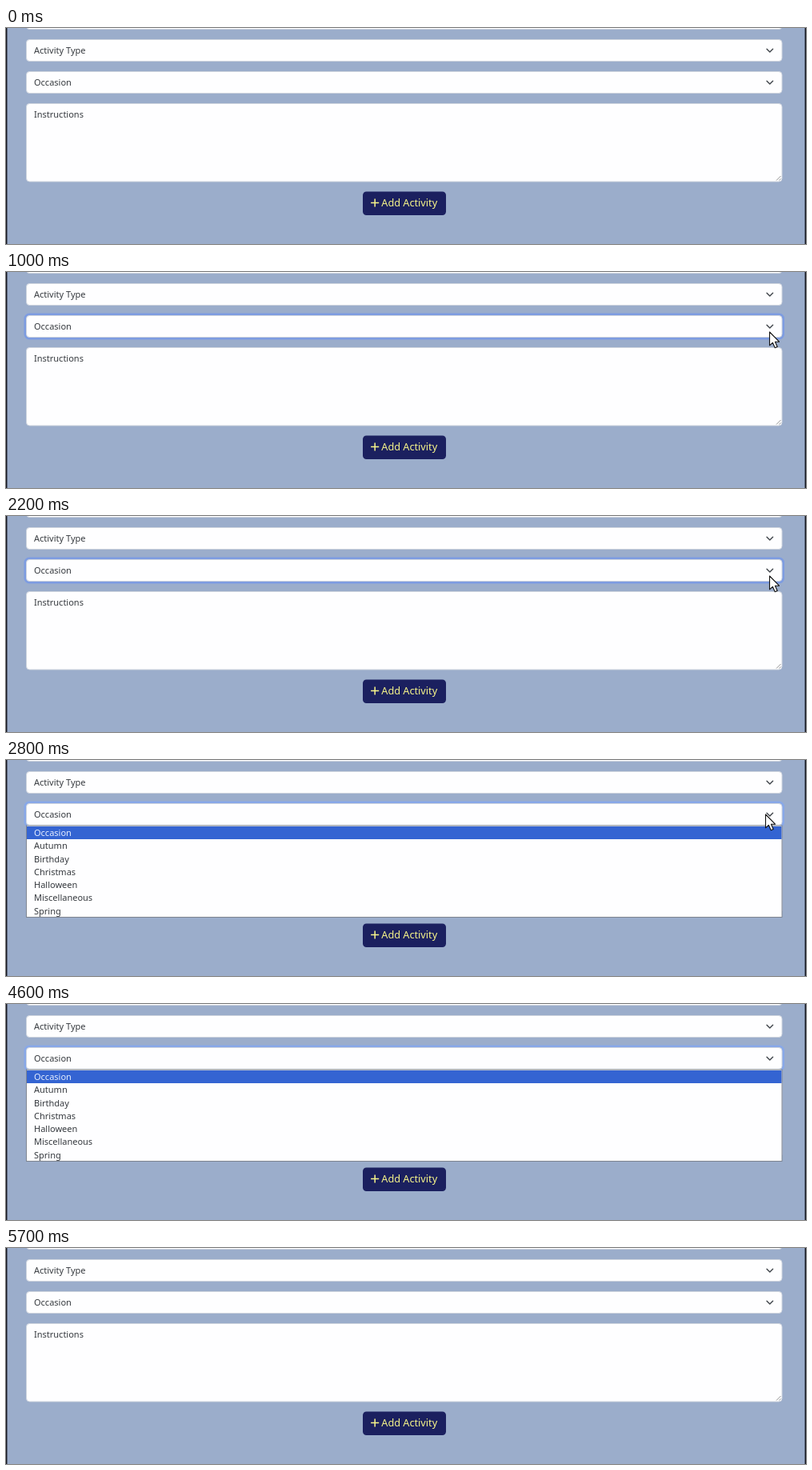
Recreate the animation shown at these times as an HTML page. Size 1000 px wide and 270 px high, loop 5800 ms.

```html
<!DOCTYPE html>
<html lang="en">
<head>
<meta charset="utf-8">
<style>
  html, body { margin: 0; width: 100%; height: 100%; overflow: hidden; background: #9badcb; }
  svg { display: block; width: 1000px; height: 270px; }
  text { font: 11px "Noto Sans", sans-serif; fill: #35393e; }
  .field { fill: #fefeff; stroke: #ced4de; }
  .line { fill: none; stroke: #40454b; stroke-width: 1.4; stroke-linecap: round; stroke-linejoin: round; }
  .button text, .button path { fill: #f8f68a; }
  .button text { font-size: 12.7px; }
  #menu text { font: 9.5px "Open Sans", sans-serif; }
</style>
</head>
<body>
<svg viewBox="0 0 1000 270">
  <defs>
    <clipPath id="page"><rect width="998" height="270"/></clipPath>
    <clipPath id="listArea"><rect x="25" y="82" width="946" height="114"/></clipPath>
    <filter id="shadow" x="-50%" y="-20%" width="200%" height="150%">
      <feDropShadow dx="0" dy="2" stdDeviation="3" flood-color="#223" flood-opacity=".35"/>
    </filter>
  </defs>

  <rect width="1000" height="270" fill="#9badcb"/>
  <rect class="field" x="25.5" y="-25" width="944.5" height="26.5" rx="4"/>

  <rect class="field" x="25.5" y="14.5" width="944.5" height="27" rx="4"/>
  <text x="35" y="32">Activity Type</text>
  <path class="line" d="M951 26.2l3.8 3.8 3.8-3.8"/>

  <rect id="ring" x="24" y="53" width="947.5" height="30" rx="5" fill="none" stroke="#7d9ce1" stroke-width="3"/>
  <rect class="field" x="25.5" y="54.5" width="944.5" height="27" rx="4"/>
  <text x="35" y="72">Occasion</text>
  <path class="line" d="M951 66.2l3.8 3.8 3.8-3.8"/>

  <rect class="field" x="25.5" y="94.5" width="944.5" height="97.5" rx="4"/>
  <text x="35" y="112">Instructions</text>
  <path d="M963 190.5l5.5-5.5M966.5 190.5l2-2" stroke="#777" stroke-width=".8"/>

  <g class="button">
    <rect x="446" y="204.5" width="104" height="29.5" rx="4.5" fill="#1b205f"/>
    <path d="M460.4 213.5h1.5v4.3h4.3v1.5h-4.3v4.3h-1.5v-4.3h-4.3v-1.5h4.3z"/>
    <text x="469.3" y="223">Add Activity</text>
  </g>

  <g id="list">
    <rect x="25.5" y="82" width="944.5" height="114.5" fill="#fefeff" stroke="#777d88" stroke-width=".9"/>
    <rect x="26" y="83" width="943.5" height="16" fill="#3464d2"/>
    <g id="options" clip-path="url(#listArea)"></g>
  </g>

  <g id="menu" clip-path="url(#page)">
    <rect x="954" y="-60" width="180" height="134.5" rx="2" fill="#fdfdfe" filter="url(#shadow)"/>
    <path d="M954 21h46" stroke="#dfe1e6"/>
    <text x="991" y="7.5">Translate</text>
    <text x="991" y="40.7">View page source</text>
    <text x="991" y="61.5">Inspect</text>
  </g>

  <path d="M.7 0V270M999.3 0V270" stroke="#15161f" stroke-width="1.5"/>
  <path id="cursor" d="M.5 0V16.8L4.3 13.3 7.2 19.8 10.2 18.5 7.4 12.2H12.5Z"
        fill="#fff" stroke="#111" stroke-width="1.1" stroke-linejoin="round"/>
</svg>
<script>
  const LOOP = 5800, STEP = 100;
  const byId = id => document.getElementById(id);
  const [ring, list, options, menu, cursor] = ["ring", "list", "options", "menu", "cursor"].map(byId);

  ["Occasion", "Autumn", "Birthday", "Christmas", "Halloween", "Miscellaneous", "Spring"].forEach((name, i) => {
    const label = document.createElementNS("http://www.w3.org/2000/svg", "text");
    label.setAttribute("x", 35);
    label.setAttribute("y", 95 + i * 16.25);
    if (i === 0) label.style.fill = "#e6eeff";
    label.textContent = name;
    options.append(label);
  });

  // Pointer stops: time, x, y
  const pointerPath = [
    [500, 985, 262], [800, 954, 75], [2200, 954, 75], [2400, 949, 68],
    [3100, 949, 68], [3400, 951, 40]
  ];

  function pointerAt(t) {
    const next = pointerPath.findIndex(stop => stop[0] > t);
    if (next < 1) return null;
    const [t0, x0, y0] = pointerPath[next - 1], [t1, x1, y1] = pointerPath[next];
    const p = (t - t0) / (t1 - t0), k = p * p * (3 - 2 * p);
    return [x0 + (x1 - x0) * k, y0 + (y1 - y0) * k];
  }

  const show = (part, on) => part.style.display = on ? "" : "none";
  const between = (t, from, to) => t >= from && t < to;

  function draw(now) {
    const t = Math.floor(now % LOOP / STEP) * STEP;
    const point = pointerAt(t), open = between(t, 2400, 4700);
    show(ring, between(t, 900, 4700));
    ring.setAttribute("stroke", open ? "#88a8e8" : "#7d9ce1");
    show(menu, between(t, 1200, 2200));
    show(list, open);
    show(cursor, point);
    if (point) cursor.setAttribute("transform", `translate(${point})`);
    requestAnimationFrame(draw);
  }
  draw(performance.now());
</script>
</body>
</html>
```
